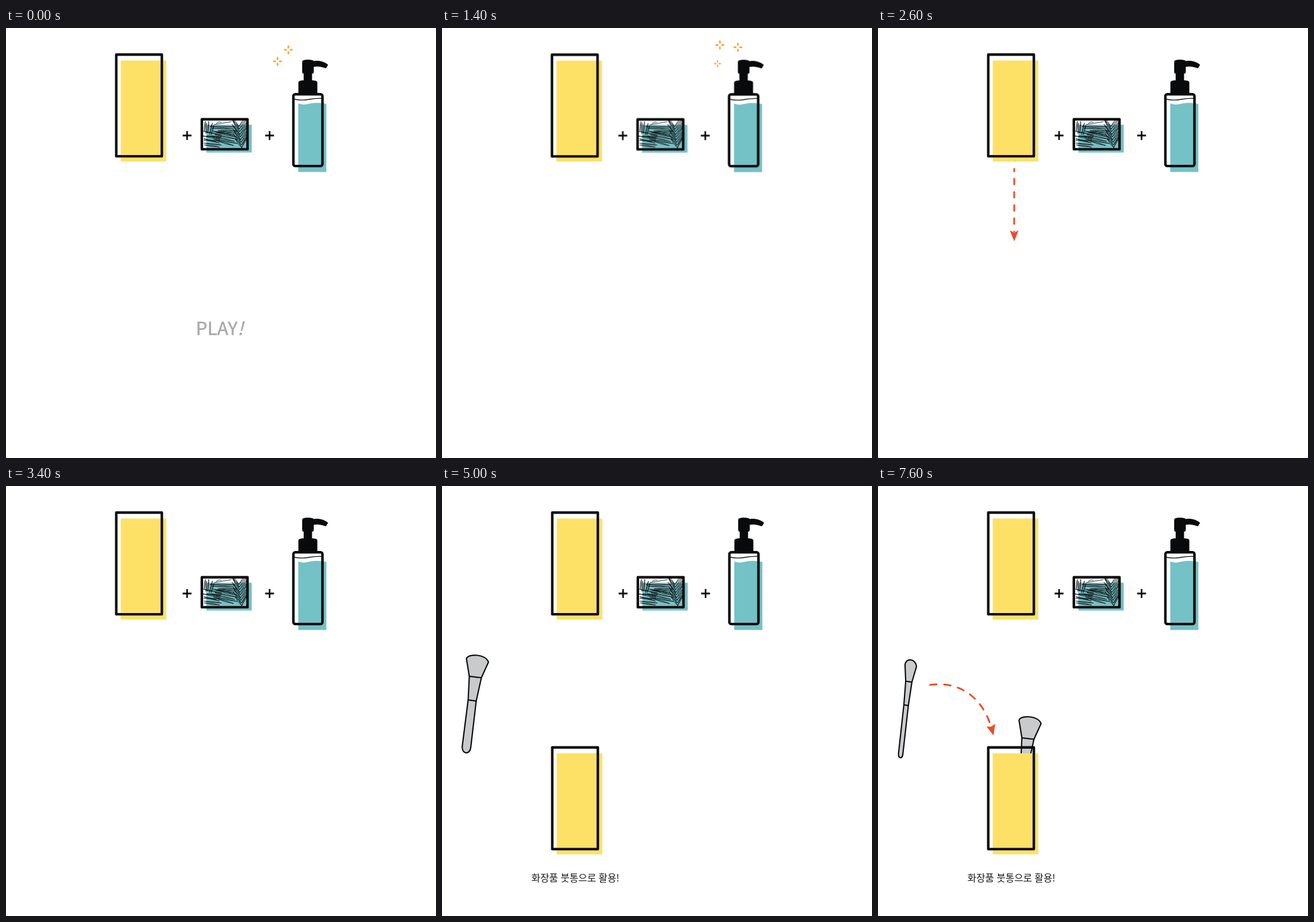
An HTML page that plays this animation: 748 by 748 pixels, repeating every 8 s.

```html
<!DOCTYPE html>
<html lang="ko">
<head>
<meta charset="utf-8">
<title>Play</title>
<style>
  html, body { margin: 0; width: 100%; height: 100%; overflow: hidden; background: #fff; }
  svg { display: block; width: 100vw; height: 100vh; }
  text { font-family: "Noto Sans CJK KR", "Noto Sans CJK", sans-serif; font-weight: 500; }
  .ink { fill: none; stroke: #090a0c; stroke-width: 4.4; stroke-linejoin: round; stroke-linecap: round; }
  .thin { stroke-width: 1.3; }
  .leaf { stroke-width: .85; }
  .plus { stroke-width: 2.8; stroke-linecap: butt; }
  .teal { fill: #74c1c6; }
  .yellow { fill: #fde167; }
  .solid { fill: #090a0c; }
  .brush { fill: #c9cacc; stroke: #090a0c; stroke-width: 2.2; stroke-linejoin: round; }
  .spark { fill: none; stroke: #f9a93f; stroke-width: 3; }
  .dash { fill: none; stroke: #ee4b27; stroke-width: 3; stroke-linecap: round; }
  .head { fill: #ee4b27; }

  /* 2.5% of the loop is 200 ms */
  .anim { animation: 8s step-end infinite; }
  #play { animation-name: play; }
  #goods { animation-name: nudge; }
  #sparkA { animation-name: sparkA; }
  #sparkB { animation-name: sparkB; }
  #down { animation-name: down; }
  #case { animation-name: case; }
  #label { animation-name: label; }
  #wideOut { animation-name: wideOut; }
  #wideIn { animation-name: wideIn; }
  #slim { animation-name: slim; }
  #curve { animation-name: curve; }

  @keyframes play {
    0%, 5%, 10% { visibility: visible; }
    2.5%, 7.5%, 12.5%, 100% { visibility: hidden; }
  }
  @keyframes nudge {
    0%, 5%, 10%, 15%, 20%, 25%, 100% { transform: none; }
    2.5%, 7.5%, 12.5%, 17.5%, 22.5% { transform: translate(-.5px, .2px); }
  }
  @keyframes sparkA {
    0%, 5%, 10%, 15%, 20% { visibility: visible; }
    2.5%, 7.5%, 12.5%, 17.5%, 22.5%, 100% { visibility: hidden; }
  }
  @keyframes sparkB {
    2.5%, 7.5%, 12.5%, 17.5%, 22.5% { visibility: visible; }
    0%, 5%, 10%, 15%, 20%, 25%, 100% { visibility: hidden; }
  }
  @keyframes down {
    25%, 32.5% { visibility: visible; }
    0%, 27.5%, 37.5%, 100% { visibility: hidden; }
  }
  @keyframes case {
    37.5%, 47.5%, 100% { visibility: visible; }
    0%, 42.5% { visibility: hidden; }
  }
  @keyframes label { 0% { visibility: hidden; } 50%, 100% { visibility: visible; } }
  @keyframes wideOut { 0%, 72.5%, 100% { visibility: hidden; } 52.5% { visibility: visible; } }
  @keyframes wideIn { 0% { visibility: hidden; } 72.5%, 100% { visibility: visible; } }
  @keyframes slim { 0% { visibility: hidden; } 80%, 100% { visibility: visible; } }
  @keyframes curve {
    57.5%, 67.5%, 85%, 95%, 100% { visibility: visible; }
    0%, 62.5%, 75%, 90% { visibility: hidden; }
  }
</style>
</head>
<body>
<svg viewBox="0 0 748 748">
  <defs>
    <g id="box">
      <rect class="yellow" x="199.5" y="56.5" width="79.3" height="175.7"/>
      <rect class="ink" x="191.8" y="46.3" width="79.3" height="176.8"/>
    </g>
    <g id="wide" class="brush">
      <path d="M45.5 372 L35.2 453 C34.5 467 48.5 468 50 455 L59.5 374 Z"/>
      <path d="M47.5 331 L45.5 372 L59.5 374 L68.5 333.5 Z"/>
      <path d="M47.5 331 L42.5 300.5 C45 291 77 292 80.8 306.5 L68.5 333.5 Z"/>
    </g>
    <path id="star" class="spark" d="M0 -7.5V-2.6M0 7.5V2.6M-7.5 0H-2.6M7.5 0H2.6"/>
    <clipPath id="soapClip"><rect x="342" y="160" width="77" height="50"/></clipPath>
  </defs>

  <g id="goods" class="anim">
    <use href="#box"/>
    <path class="ink plus" d="M307.3 187H322.7M315 179.3V194.7M450.8 187H466.2M458.5 179.3V194.7"/>

    <rect class="teal" x="348.5" y="168.3" width="79" height="48.3"/>
    <path id="leaves" class="ink leaf" clip-path="url(#soapClip)"/>
    <rect class="ink" x="340.7" y="158.7" width="79.4" height="52.2"/>

    <path class="teal" d="M508.4 131 C514 133.5 519 133.8 526 132 C536 129.4 545 129.8 557.3 132 V250.6 H508.4 Z"/>
    <path class="ink thin" d="M502 124 C512 126 520 125.6 528 124 C536 122.3 542 122 550 122.4"/>
    <rect class="ink" x="499.9" y="115.3" width="50.6" height="124.8" rx="3.5"/>
    <path class="solid" d="M508.6 114 V95 Q508.6 92.4 511 92 Q514 91.2 517.8 91 V79.5 Q515.2 79 515.2 76.5
      V59 Q515.2 56.6 517.6 56 Q525 53.8 533 56 Q535.2 56.6 535.4 57.4 C544 56 553 57.6 560.3 64
      L557 69.4 Q556 70.6 554.3 69.6 C548 66.8 542 66.4 535.4 67.4 V76.5 Q535.4 79 532.4 79.5
      V91 Q536 91.2 539.2 92 Q541.6 92.4 541.6 95 V114 Z"/>
    <path class="ink" d="M515 114.6 H535.5"/>
  </g>

  <g id="sparkA" class="anim">
    <use href="#star" x="491.2" y="38"/>
    <use href="#star" x="472.4" y="58"/>
  </g>
  <g id="sparkB" class="anim">
    <use href="#star" x="483.4" y="29.6"/>
    <use href="#star" x="514.7" y="33.6"/>
    <use href="#star" transform="translate(479.2 62) scale(.77)"/>
  </g>

  <text id="play" class="anim" x="330.3" y="533.5" font-size="31.5" fill="#a9a9a9" stroke="#a9a9a9" stroke-width=".5">PLAY<tspan font-style="italic">!</tspan></text>

  <g id="down" class="anim">
    <path class="dash" d="M236.9 245V354" stroke-dasharray="9.8 13.1" stroke-dashoffset="5.6"/>
    <path class="head" d="M229.3 352 L236.9 356 L244.5 352 L236.9 371 Z"/>
  </g>

  <use id="wideIn" class="anim" href="#wide" x="202.8" y="107"/>
  <g id="case" class="anim"><use href="#box" y="408.5"/></g>
  <text id="label" class="anim" x="155.6" y="687.5" font-size="17" letter-spacing="-.25" fill="#1c1c1c">화장품 붓통으로 활용!</text>
  <use id="wideOut" class="anim" href="#wide"/>

  <g id="slim" class="anim brush">
    <path d="M45 380.5 L35.6 466 C35.6 474.5 42 475 43.2 467 L52.8 382 Z"/>
    <path d="M48.2 339.5 L45 380.5 L52.8 382 L59 341 Z"/>
    <path d="M48.2 339.5 L47 311 C48 299 65 299 67 314 L59 341 Z"/>
  </g>

  <g id="curve" class="anim">
    <path class="dash" d="M90.5 346 C140 339 178 366 194 411" pathLength="132" stroke-dasharray="11.5 12.6"/>
    <path class="head" d="M188.8 418.5 L196.6 418.8 L203.8 413.8 L201 434 Z"/>
  </g>
</svg>

<script>
  let seed = 7;
  const random = () => (seed = (seed * 16807) % 2147483647) / 2147483647;
  const vary = amount => (random() - .5) * 2 * amount;

  // A narrow pointed leaf growing from (x, y)
  function leaf(x, y, degrees, length, width = 2) {
    const a = degrees * Math.PI / 180, c = Math.cos(a), s = Math.sin(a);
    const at = (along, across) =>
      `${(x + c * along - s * across).toFixed(1)} ${(y + s * along + c * across).toFixed(1)}`;
    return `M${at(0, 0)}Q${at(length * .5, width)} ${at(length, 0)}Q${at(length * .5, -width)} ${at(0, 0)}`;
  }

  let d = 'M362 168L392 163M366 166Q370 162 374 164';
  for (let i = 0; i < 9; i++) {
    const y = 208 - i * 4.6, x = 410 - i * .6;
    d += leaf(x, y, -58 + vary(6), 23 + vary(4));
    d += leaf(x, y, -124 + vary(6), 22 + vary(4));
  }
  for (let i = 0; i < 10; i++) {
    d += leaf(399 + vary(4), 172 + i * 3.6, 184 + i * 1.5 + vary(7), 36 + vary(9), 1.9);
    if (i < 7) d += leaf(374 + vary(6), 186 + i * 3.5, 186 + vary(12), 28 + vary(5), 1.7);
  }
  for (let i = 0; i < 5; i++) {
    d += leaf(345 + i * 3, 182 + vary(4), -88 + i * 3 + vary(4), 18 + vary(3), 1.4);
  }
  document.getElementById('leaves').setAttribute('d', d);
</script>
</body>
</html>
```
